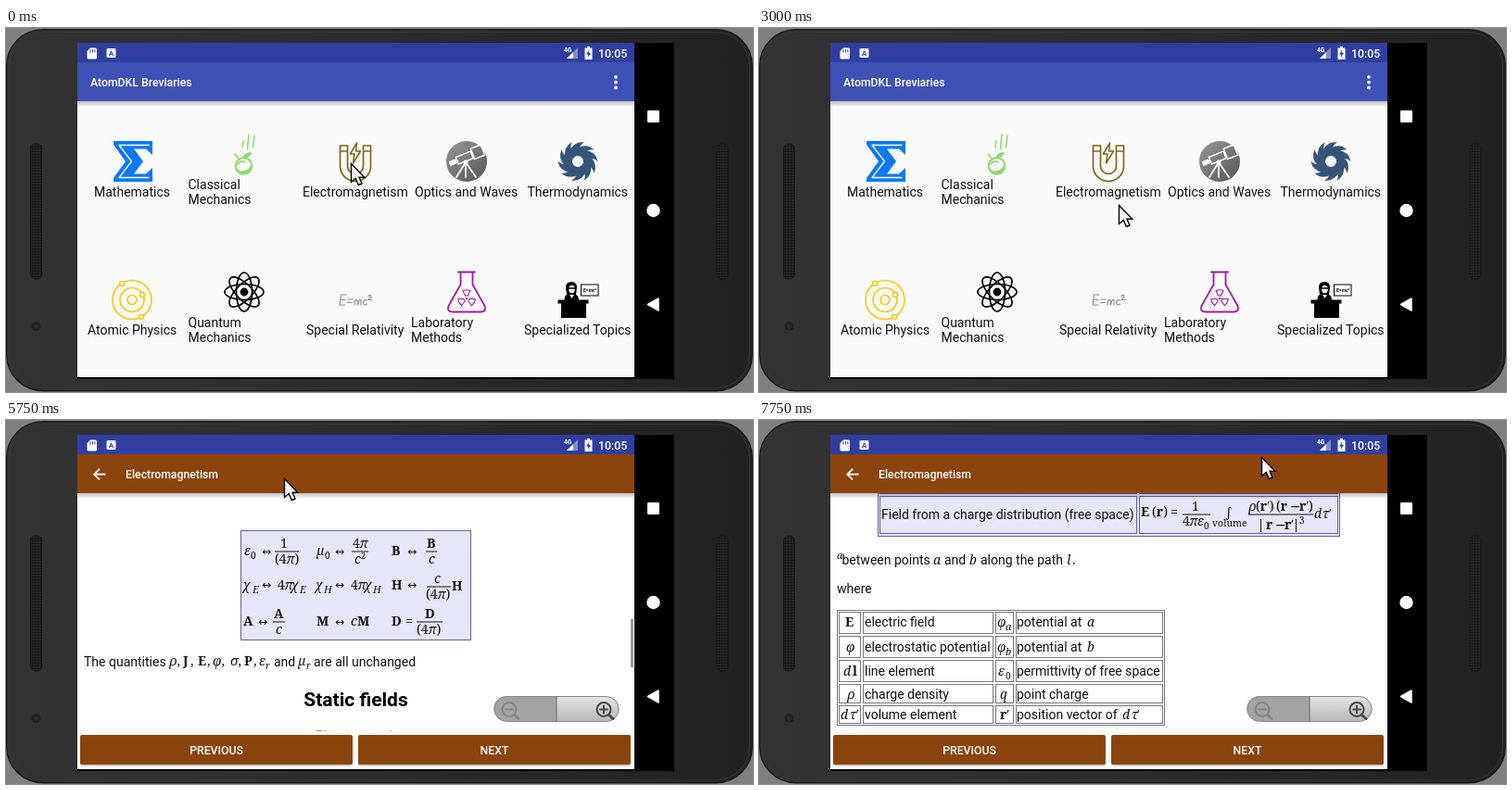
These frames come from a looping animation (806 by 393 pixels, 8000 ms). An HTML page:

```html
<!DOCTYPE html>
<html lang="en">
<head>
<meta charset="utf-8">
<title>Physics notes on a phone</title>
<style>
html, body { margin: 0; width: 100%; height: 100%; overflow: hidden; background: #808080; }
svg { display: block; width: 806px; height: 393px; font-family: Roboto, sans-serif; }
.med { font-weight: 500; font-size: 12.25px; fill: #fff; }
.lab { font-size: 14px; fill: #111; }
.item { font-size: 15.75px; fill: #111; }
.math { font-family: "Noto Serif", "DejaVu Sans", serif; fill: #111; }
.line { fill: none; stroke-linecap: round; stroke-linejoin: round; }
</style>
</head>
<body>
<svg id="stage" viewBox="0 0 806 393"></svg>
<script>
const BROWN = '#8b440c', BLUE = '#3f51b5', VIOLET = '#483d8b';
const STEP = 250, LOOP = 8000;

const text = (x, y, s, cls, extra = '') => `<text x="${x}" y="${y}" class="${cls}" ${extra}>${s}</text>`;
const rect = (x, y, w, h, fill, extra = '') =>
  `<rect x="${x}" y="${y}" width="${w}" height="${h}" fill="${fill}" ${extra}/>`;
const circle = (x, y, r, fill, extra = '') => `<circle cx="${x}" cy="${y}" r="${r}" fill="${fill}" ${extra}/>`;
const path = (d, fill, extra = '') => `<path d="${d}" fill="${fill}" ${extra}/>`;
const line = (d, color, w, extra = '') => `<path d="${d}" class="line" stroke="${color}" stroke-width="${w}" ${extra}/>`;
const group = (id, body, extra = '') => `<g id="${id}" ${extra}>${body}</g>`;
const shift = (dy, body) => `<g transform="translate(0 ${dy})">${body}</g>`;
const spin = (n, cx, cy, body, turn = 360) =>
  Array.from({ length: n }, (_, i) => `<g transform="rotate(${i * turn / n} ${cx} ${cy})">${body}</g>`).join('');

// Formula pieces "x:dy:size text" split by "|"; *bold*, _italic_
function math(y, spec) {
  return spec.split('|').map(part => {
    const cut = part.indexOf(' ');
    const [x, dy = 0, size = 14] = part.slice(0, cut).split(':').map(Number);
    const s = part.slice(cut + 1)
      .replace(/\*(.+?)\*/g, '<tspan font-weight="700">$1</tspan>')
      .replace(/_(.+?)_/g, '<tspan font-style="italic">$1</tspan>');
    return text(x, y + dy, s, 'math', `font-size="${size}"`);
  }).join('');
}
const bar = (x1, x2, y) => rect(x1, y - .5, x2 - x1, 1, '#111');
const norm = (x1, x2, y) => rect(x1, y, 1, 14, '#111') + rect(x2, y, 1, 14, '#111');
const cell = (x1, x2, y1, y2, color) =>
  rect(x1 + .5, y1 + .5, x2 - x1 - 1, y2 - y1 - 1, 'none', `stroke="${color}" stroke-opacity=".8"`);

function defs() {
  return `<defs>
  <linearGradient id="body"><stop offset="0" stop-color="#333"/><stop offset=".5" stop-color="#2c2c2c"/><stop offset="1" stop-color="#222"/></linearGradient>
  <linearGradient id="shade" x2="0" y2="1"><stop stop-color="#000" stop-opacity=".25"/><stop offset="1" stop-color="#000" stop-opacity="0"/></linearGradient>
  <linearGradient id="lens" x2="1" y2="1"><stop stop-color="#999"/><stop offset="1" stop-color="#555"/></linearGradient>
  <linearGradient id="key" x2="0" y2="1"><stop stop-color="#e4e4e4"/><stop offset="1" stop-color="#b4b4b4"/></linearGradient>
  <pattern id="mesh" width="3" height="3" patternUnits="userSpaceOnUse"><rect width="3" height="3" fill="#2b2b2b"/><circle cx="1.5" cy="1.5" r="1.1" fill="#101010"/></pattern>
  <clipPath id="view"><rect x="77" y="79" width="601" height="256.5"/></clipPath></defs>`;
}

function phone() {
  const speaker = x => rect(x, 125, 12, 146, 'url(#mesh)', 'rx="5" stroke="#191919"');
  return rect(0, 0, 806, 393, '#808080') +
    rect(.7, 1.7, 804.6, 390, 'url(#body)', 'rx="39" stroke="#1c1c1c" stroke-width="1.400"') +
    rect(3.5, 4.5, 799, 384.5, 'none', 'rx="37" stroke="#393939"') +
    speaker(26.5) + speaker(767) +
    circle(32.5, 322, 5, '#222225') + circle(32.5, 322, 2.5, '#2b2d38') +
    rect(77, 16, 644, 363, '#000');
}

function navBar() {
  return rect(692, 89, 13, 13, '#fff', 'rx="1"') + circle(698.5, 197, 7.2, '#fff') +
    path('M692.5 298.5L704 292V305Z', '#fff', 'stroke="#fff" stroke-width="1.5" stroke-linejoin="round"');
}

function statusBar() {
  return rect(77, 16, 601, 21, '#303f9f') +
    path('M91 21.5H96.5Q98 21.5 98 23V32Q98 33.5 96.5 33.5H89Q87.5 33.5 87.5 32V25Z', '#fff') +
    line('M91 23.5V26M93.5 23.5V26M95.8 23.5V26', '#303f9f', 1) +
    rect(108.5, 22, 10, 10, '#fff', 'rx="1.5"') +
    text(113.5, 30, 'A', 'med', 'text-anchor="middle" style="font-size:8px;font-weight:700;fill:#303f9f"') +
    text(602, 26, '4G', 'med', 'style="font-size:6.5px;font-weight:700"') +
    path('M617 21V33H605Z', '#fff', 'opacity=".4"') + path('M612 26V33H605Z', '#fff') +
    path('M627 20H630V21.5H632.5V34H624.5V21.5H627Z', '#fff') +
    path('M629.3 23.5L626 28.5H628.2L627.7 32L631 27H628.8Z', '#303f9f') +
    text(639, 31.7, '10:05', 'med');
}

function icons() {
  const gold = '#80651a', green = '#93d672', sun = '#f6c91d', plum = '#a01aa0';
  const sigma = path('M116 122H158V137L151 130.5H138L148 144L138 157.500H151L158 151V166H116V162L129 144L116 126Z', '#0b78f4') +
    line('M154 126.500H122L135.500 144L122 161.500H154', '#fff', 1.3);
  const apple = line('M256 122L255 129M262 115L260.500 131M268 116L266.500 129', green, 1.6) +
    circle(256.5, 149, 8.8, '#fafafa', `stroke="${green}" stroke-width="2"`) +
    path('M248 150Q252 157 260 153Q265 150 264 145Q267 155 257 158Q249 157 248 150Z', green) +
    path('M255 141Q256 134 265 134Q264 141 255 141Z', green) +
    line('M250 147Q253 142 258 145M247 136L251 141', green, 1.6);
  const magnet = line('M360.5 127H368.5V149A8.5 8.5 0 0 0 385.5 149V127H393.5V149A16.5 16.5 0 0 1 360.5 149ZM360.5 133H368.5M385.5 133H393.5', gold, 1.7) +
    line('M378.5 124L371.5 136H376L374.5 146L382.5 133H377.5Z', gold, 1.5);
  const scope = circle(497, 144, 22, 'url(#lens)') +
    `<g transform="rotate(-22 496 139)">${rect(477, 137, 8, 5, '#fff')}${rect(486, 135.5, 17, 8, 'none', 'stroke="#fff" stroke-width="1.5"')}${rect(504, 133, 12, 12, 'none', 'stroke="#fff" stroke-width="1.5"')}</g>` +
    line('M496 145L486 161M496 145V161M496 145L507 161', '#fff', 1.7) + circle(496, 145, 2.5, '#fff');
  const turbine = circle(617, 144, 10.5, 'none', 'stroke="#36557a" stroke-width="9"') +
    spin(10, 617, 144, path('M608 133Q613 122 624 123.5Q617.5 127 619 132Z', '#36557a'));
  const orbit = r => circle(136, 293.5, r, 'none', `stroke="${sun}" stroke-width="1.7"`);
  const dot = (x, y, r) => circle(x, y, r, '#fafafa', `stroke="${sun}" stroke-width="1.6"`);
  const atom = orbit(21) + orbit(13) + orbit(5) + dot(125, 276, 2.5) + dot(147, 288, 2.6) + dot(146, 312, 2.5);
  const quantum = spin(4, 257, 285,
    '<ellipse cx="257" cy="285" rx="8.5" ry="21" fill="none" stroke="#000" stroke-width="1.7"/>', 180) +
    circle(257, 285, 4.4, '#000');
  const emc = line('M367 288H361.5L360 299H366M361 293.5H366M369 293H374M368.5 296.5H373.5M376 299L377 293.5Q380 292 379.5 299Q381 292 383 293.5L383 299M389.5 294Q385.5 292.5 385.5 297Q386 300 389.5 298M391 289.5Q394 287 394 290L391 293.5H395', '#909090', 1.2);
  const flask = line('M488 263.5H506M490.5 264V277L477.5 300Q475.5 306.5 482 306.5H512Q518.5 306.5 516.5 300L503.5 277V264', plum, 1.8) +
    spin(3, 497, 292, line('M495.5 289L493 283.5Q497 282 501 283.5L498.500 289Z', plum, 1.1)) + circle(497, 292, 1.2, plum);
  const teacher = rect(595.5, 293.5, 33, 4, '#000') + rect(599, 297, 27, 16, '#000') +
    path('M602.5 294Q602.5 289 605 288L604 280Q604 274 610 274Q616 274 616 280L615 288Q618 289 618 294Z', '#000') +
    '<ellipse cx="610.5" cy="282" rx="3.3" ry="4.3" fill="#fafafa"/>' + line('M607 281H614', '#000', 1.6) +
    path('M608 288H613L610.500 292Z', '#fafafa') +
    rect(620.5, 277, 18.5, 12, '#fff', 'stroke="#000"') +
    text(623, 285, 'E=mc²', 'lab', 'style="font-size:5px;font-weight:700"');
  return sigma + apple + magnet + scope + turbine + atom + quantum + emc + flask + teacher;
}

function home() {
  const labels = [
    [95, 181.5, 'Mathematics'], [196.5, 173.5, 'Classical'], [196.5, 189.5, 'Mechanics'],
    [320, 181.5, 'Electromagnetism'], [441, 181.5, 'Optics and Waves'], [562.5, 181.5, 'Thermodynamics'],
    [88, 330.5, 'Atomic Physics'], [196.5, 322.5, 'Quantum'], [196.5, 338.5, 'Mechanics'],
    [324, 330.5, 'Special Relativity'], [437, 322.5, 'Laboratory'], [437, 338.5, 'Methods'],
    [559, 330.5, 'Specialized Topics']];
  return rect(77, 79, 601, 298, '#fafafa') + icons() + labels.map(l => text(...l, 'lab')).join('');
}

function list() {
  const items = ['Static Fields', 'Electromagnetic Fields', 'Fields Associated with Media', 'Force, Torque and Energy', 'LCR Circuits'];
  return rect(77, 79, 601, 298, '#fafafa') + items.map((s, i) =>
    text(91, 107 + 43 * i, s, 'item') + rect(77, 122 + 43 * i, 601, 1, '#dadada')).join('');
}

const heading = (y, s) => text(377.5, y, s, 'lab', 'text-anchor="middle" style="font-size:21px;font-weight:700;fill:#000"');

function units() {
  const intro = ['The equations on these pages are written in SI units. Each of them can also be',
    'written in Gaussian units by exchanging the symbols in the table below.'];
  return heading(-65, 'Electromagnetism') + intro.map((s, i) => text(84, -20 + 17 * i, s, 'lab')).join('') +
    rect(253.5, 42.5, 248, 118, '#e6e6fa', `stroke="${VIOLET}" stroke-opacity=".8"`) +
    math(69, '257 _ε_|264:4:10 0|276:0:12 ↔|296:-8 1|290:9 (4_π_)|335 _μ_|344:4:10 0|355:0:12 ↔|374:-8 4_π_|376:9 _c_|383:4:9 2|416 *B*|433:0:12 ↔|454:-8 *B*|456:9 _c_') +
    bar(290, 316, 65) + bar(373, 391, 65) + bar(453, 465, 65) +
    math(106, '256 _χ_|266:4:11 _E_|276:-1:12 ↔|293 4_π_|308 _χ_|317:4:11 _E_|334 _χ_|343:4:11 _H_|355:-1:12 ↔|372 4_π_|387 _χ_|396:4:11 _H_|416 *H*|433:-1:12 ↔|462:-7 _c_|453:10 (4_π_)|481:1 *H*') +
    bar(454, 480, 103) +
    math(145, '256 *A*|272:0:12 ↔|289:-8 *A*|291:9 _c_|335 *M*|355:0:12 ↔|372 _c_|379 *M*|416 *D*|431 =|452:-8 *D*|443:9 (4_π_)') +
    bar(288, 301, 141) + bar(443, 471, 141) +
    text(84, 188.5, 'The quantities', 'lab') + text(289, 188.5, 'and', 'lab') + text(332, 188.5, 'are all unchanged', 'lab') +
    math(188, '176 _ρ_,|191 *J*|199 ,|207 *E*|217 ,|223 _φ_,|242 _σ_,|257 *P*|267 ,|273 _ε_|280:4:10 _r_|315 _μ_|324:4:10 _r_');
}

function statics() {
  const rows = [[164, 186], [187, 228], [229, 271], [273, 356], [358, 399]];
  return heading(104, 'Static fields') + circle(323.5, 136.5, 3.7, VIOLET) +
    text(333, 141.5, 'Electrostatics', 'lab', `style="font-size:16.38px;font-weight:700;fill:${VIOLET}"`) +
    rect(128.5, 162.5, 498, 239, '#e6e6fa', `stroke="${VIOLET}" stroke-opacity=".8"`) +
    rows.map(([a, b]) => cell(130, 408, a, b, VIOLET) + cell(410, 625, a, b, VIOLET)).join('') +
    text(132, 180, 'Electrostatic potential', 'lab') + math(180, '412 *E*|427 =|436 −|444 ∇|453 _φ_') +
    text(132, 213, 'Potential difference', 'lab') + math(207, '254:0:12 _a_') +
    math(211, '412 _φ_|421:5:11 _a_|431:0:11 -|439 _φ_|448:5:11 _b_|458 =|470:0:15 ∫|471:-13:10 _b_|470:10:10 _a_|480 *E*|494 ·|501 _d_|511 *l*|521 =|532:0:12 −|541:0:15 ∫|542:-13:10 _a_|541:10:10 _b_|551 *E*|565 ·|572 _d_|582 *l*') +
    text(132, 254, 'Poisson\'s Equation (free space)', 'lab') +
    math(251, '412 ∇|421:-5:9 2|426 _φ_|439 =|449:0:12 −|460:-6 _ρ_|459:11 _ε_|466:15:10 0') + bar(457, 473, 248) +
    text(132, 319, 'Point charge at', 'lab') + math(319, '229 *r*′') +
    math(296, '412 _φ_|421 (*r*)|440 =|493:-8 _q_|456:9 4_π_|472:9 _ε_|479:13:10 0|498:9 *r*|508:9 −|519:9 *r*′') +
    bar(455, 540, 291) + norm(490.5, 536, 294) +
    math(333, '412 *E*|424 (*r*)|444 =|478:-7 _q_|486:-7 (*r*|500:-7 −|511:-7 *r*′)|456:13 4_π_|472:13 _ε_|479:17:10 0|498:13 *r*|508:13 −|519:13 *r*′|541:8:10 3') +
    bar(456, 548, 331) + norm(490.5, 536, 335);
}

function legend() {
  const tops = [[207, 231], [233, 257], [259, 283], [285, 306], [308, 328]], base = [223, 249.5, 276, 300.5, 322.5];
  const left = ['electric field', 'electrostatic potential', 'line element', 'charge density', 'volume element'];
  const right = ['potential at', 'potential at', 'permittivity of free space', 'point charge', 'position vector of'];
  const sym = ['93 *E*|257 _φ_|266:4:11 _a_|354 _a_', '94 _φ_|257 _φ_|266:4:11 _b_|354 _b_', '91 _d_|101 *l*|258 _ε_|266:4:10 0',
    '95 _ρ_|260 _q_', '88 _d_|98 _τ_|105 ′|260 *r*′|392 _d_|402 _τ_|408 ′'];
  return text(132, 106.5, 'Field from a charge distribution (free space)', 'lab') +
    math(104, '412 *E*|424 (*r*)|444 =|467:-6 1|457:10 4_π_|473:10 _ε_|480:14:10 0|503:1:15 ∫|489:11:10.5 volume|528:-6 _ρ_|536:-6 (*r*′)|558:-6 (*r*|573:-6 −|583:-6 *r*′)|547:14 *r*|557:14 −|567:14 *r*′|583:8:10 3|599:2 _d_|608:2 _τ_|615:2 ′') +
    bar(457, 487, 102) + bar(528, 598, 102) + norm(541, 579, 107) +
    math(150, '84:0:11 _a_') + text(89.5, 156, 'between points', 'lab') + text(200, 156, 'and', 'lab') + text(239, 156, 'along the path', 'lab') +
    math(156, '188 _a_|227 _b_|332 _l_|338 .') + text(84, 186.5, 'where', 'lab') +
    cell(84, 438, 205, 330, '#555') +
    tops.map(([a, b], i) => [[86, 110], [112, 253], [255, 275], [277, 436]].map(c => cell(...c, a, b, '#555')).join('') +
      text(114, base[i], left[i], 'lab') + text(278, base[i], right[i], 'lab') + math(base[i], sym[i])).join('');
}

function zoom() {
  const glass = (x, c, plus) => line(`M${x + 5.5} 318.5L${x + 10} 322.5`, c, 3) + circle(x, 312.5, 7.5, 'none', `stroke="${c}" stroke-width="2"`) +
    line(`M${x - 4} 312.5H${x + 4}` + (plus ? `M${x} 308.5V316.5` : ''), c, 2);
  return path('M594 298H540A13.5 13.5 0 0 0 540 325.5H594Z', '#8c8c8c', 'opacity=".8"') +
    path('M594 298H648A13.5 13.5 0 0 1 648 325.5H594Z', 'url(#key)', 'opacity=".96"') +
    rect(527, 298.5, 134, 27, 'none', 'rx="13.5" stroke="#888"') + rect(593.5, 298, 1, 27.5, '#666') +
    glass(543, '#858585', false) + glass(645, '#484848', true);
}

function page() {
  const button = (x, s) => rect(x, 341.5, 294, 32, '#000', 'rx="2" opacity=".25"') + rect(x, 340, 294, 32, BROWN, 'rx="2"') +
    text(x + 147, 361, s, 'med', 'text-anchor="middle"');
  const doc = group('doc', shift(-128, units()) + statics() + shift(276, legend()));
  return rect(77, 79, 601, 298, '#fff') + `<g clip-path="url(#view)">${doc}</g>` +
    rect(674, 238, 3, 52, '#9a9a9a', 'id="thumb"') + group('zoom', zoom()) + button(80, 'PREVIOUS') + button(380, 'NEXT');
}

function bars() {
  const toolbar = color => rect(77, 37, 601, 42, color);
  return rect(77, 79, 601, 6, 'url(#shade)') +
    group('homeBar', toolbar(BLUE) + text(91, 63.3, 'AtomDKL Breviaries', 'med') +
      [52.8, 58.6, 64.4].map(y => circle(658, y, 1.9, '#fff')).join('')) +
    group('backBar', toolbar(BROWN) + text(129, 63.3, 'Electromagnetism', 'med') +
      line('M107.5 58.7H95.5M101 53L95.2 58.7L101 64.4', '#fff', 1.8, 'style="stroke-linecap:butt;stroke-linejoin:miter"'));
}

const $ = id => document.getElementById(id);
$('stage').innerHTML = defs() + phone() + group('home', home()) + group('list', list()) + group('page', page()) +
  bars() + statusBar() + navBar() +
  group('cursor', path('M.5 .5V20.5L5.2 16.3L8.3 23.5L12 22L9 15.3H14.8Z', '#fff', 'stroke="#000" stroke-width="1.4"'));

// time, pointer x, pointer y, scroll
const track = [
  [0, 372, 146, -310], [250, 373, 146, -310], [1250, 373, 146, -310], [2250, 97, 55, -310], [2500, 97, 55, -310],
  [3000, 388, 191, -310], [3500, 374, 148, -310], [3750, 374, 148, -310], [4250, 350, 102, -310], [4500, 350, 102, -310],
  [5000, 354, 172, -310], [5250, 340, 230, -310], [5750, 300, 63, -205], [6000, 230, 290, -195],
  [6250, 222, 219, -128], [7000, 264, 72, 0], [7250, 430, 290, 12], [7750, 542, 40, 276], [8000, 542, 40, 276]];
const screens = [[0, 'home'], [1000, 'list'], [2750, 'home'], [3750, 'list'], [4750, 'page']];

function pose(t) {
  const i = track.findIndex((k, n) => n && t < k[0]);
  const a = track[i - 1], b = track[i], p = (t - a[0]) / (b[0] - a[0]);
  return a.slice(1).map((v, n) => v + (b[n + 1] - v) * p);
}
const show = (id, on) => $(id).style.display = on ? '' : 'none';

function draw(ms) {
  const t = Math.floor(ms % LOOP / STEP) * STEP;
  const [x, y, scroll] = pose(t);
  const now = screens.filter(s => s[0] <= t).pop()[1];
  for (const id of ['home', 'list', 'page']) show(id, id === now);
  show('homeBar', now === 'home');
  show('backBar', now !== 'home');
  show('doc', t >= 5250);
  show('zoom', t >= 5500);
  show('thumb', t >= 5500 && t < 6750);
  $('thumb').setAttribute('y', 238 + (scroll + 128) * .3);
  $('doc').setAttribute('transform', `translate(0 ${-scroll})`);
  $('cursor').setAttribute('transform', `translate(${Math.round(x)} ${Math.round(y)})`);
}

const start = performance.now();
function tick(now) {
  draw(Math.max(0, now - start));
  requestAnimationFrame(tick);
}
draw(0);
requestAnimationFrame(tick);
</script>
</body>
</html>
```
